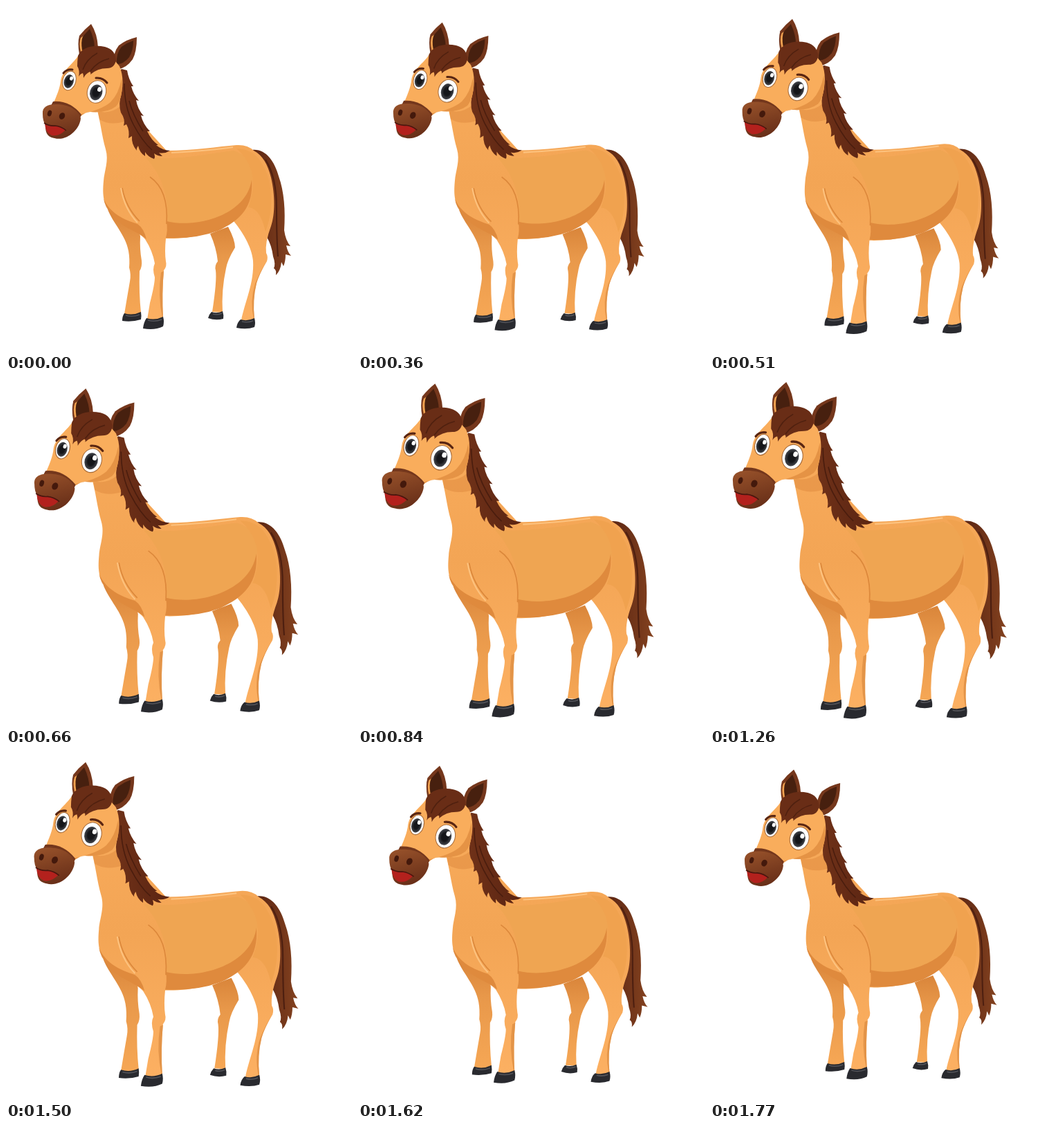
These frames come from a looping animation (500 px wide and 500 px high, 1800 ms). An HTML page:

```html
<!DOCTYPE html>
<html lang="en">
<head>
<meta charset="utf-8">
<title>Horse</title>
<style>
  html, body { margin: 0; width: 100%; height: 100%; overflow: hidden; background: #fff; }
  svg { display: block; width: 100vw; height: 100vh; }
</style>
</head>
<body>
<svg viewBox="0 0 500 500">
  <defs>
    <linearGradient id="coat" x1="0" y1="0" x2="0" y2="1">
      <stop offset="0" stop-color="#f8ab5b"/>
      <stop offset=".45" stop-color="#f3a555"/>
      <stop offset="1" stop-color="#fcb062"/>
    </linearGradient>
    <linearGradient id="far" x1="0" y1="0" x2="0" y2="1">
      <stop offset="0" stop-color="#d9853a"/>
      <stop offset=".35" stop-color="#e8984a"/>
      <stop offset="1" stop-color="#f6a755"/>
    </linearGradient>
    <linearGradient id="tail" x1="0" y1="0" x2="1" y2="0">
      <stop offset="0" stop-color="#5a2513"/>
      <stop offset="1" stop-color="#84421f"/>
    </linearGradient>
    <linearGradient id="mane" x1="0" y1="0" x2="1" y2="0">
      <stop offset="0" stop-color="#6f3118"/>
      <stop offset="1" stop-color="#5a2412"/>
    </linearGradient>
    <linearGradient id="nose" x1="0" y1="0" x2=".3" y2="1">
      <stop offset="0" stop-color="#99532b"/>
      <stop offset="1" stop-color="#6a3019"/>
    </linearGradient>
    <radialGradient id="iris">
      <stop offset=".5" stop-color="#15161a"/>
      <stop offset="1" stop-color="#45474d"/>
    </radialGradient>
  </defs>

  <g id="horse">
    <!-- tail -->
    <path fill="url(#tail)" d="M356 208C375 206 388 224 394 246C402 268 404 296 402 324Q404 339 411 347L405 346Q407 356 412 361L404 359Q404 369 401 376L398 370Q397 382 390 389Q391 381 387 379Q390 373 386 362Q384 346 377 334L384 290Z"/>
    <path fill="none" stroke="#4d1f10" stroke-width="2" d="M375 222Q391 247 391 292T393 362"/>

    <!-- far legs -->
    <path fill="url(#far)" d="M147 294C154 313 173 331 177 354Q179 365 178 378Q181 388 179 398Q175 421 171 445Q182 449 195 443Q192 415 193 383Q197 377 196 368Q193 351 194 333L190 310Z"/>
    <path fill="url(#far)" d="M295 329Q304 349 306 369Q301 375 303 382Q305 397 298 442L313 443Q311 411 318 379Q320 367 331 349Q331 338 321 319Z"/>

    <!-- body with near legs -->
    <path fill="url(#coat)" d="M130 144C137 168 138 186 144 207C149 224 142 238 141 253C139 275 141 286 152 299C165 315 191 325 201 337Q212 354 215 372Q211 380 215 392Q215 402 208 429L204 453Q215 458 227 451Q225 416 228 382Q233 376 231 369Q229 355 231 336C263 337 300 330 329 311C340 324 355 347 357 368C359 400 345 428 340 454Q349 459 359 453Q356 422 362 400Q368 383 377 369Q379 362 376 357Q374 342 383 318C389 301 389 273 383 248C378 228 371 216 358 209Q349 200 333 201C307 203 272 209 232 209L200 174L168 96Z"/>
    <!-- barrel -->
    <path fill="#efa552" d="M202 219C250 224 306 211 329 209C353 216 361 240 355 259C347 294 315 311 281 317Q252 321 233 316C235 279 229 249 202 219Z"/>
    <path fill="#f0a24f" d="M333 206Q359 206 371 230C386 254 387 298 375 326C371 308 364 292 350 291Q370 238 333 206Z"/>
    <!-- shadows -->
    <path fill="#df8a3d" d="M232 311C278 322 348 301 355 251C358 290 339 310 306 325Q274 337 231 335Q234 324 232 311Z"/>
    <path fill="#df8a3d" d="M141 278C150 300 171 309 190 315Q199 321 203 337C190 325 163 319 152 300Q143 291 141 278Z"/>
    <path fill="#e08d40" d="M133 152Q151 157 166 144L168 110Q166 143 174 166Q151 174 135 164Z" opacity=".55"/>
    <path fill="none" stroke="#dc883b" stroke-width="1.6" d="M208 247C227 260 234 285 232 315M168 263Q173 291 193 311"/>
    <path fill="none" stroke="#fdc27e" stroke-width="2" d="M166 263Q171 293 190 313M239 212Q294 209 328 204"/>
    <path fill="#e39448" d="M226 451Q219 418 224 385L228 383Q225 415 227 451ZM358 453Q352 426 360 401Q368 382 376 370Q365 389 362 401Q356 425 359 453Z"/>

    <!-- hooves -->
    <g fill="#292a2f">
      <path d="M171 444Q183 448 195 442Q196 448 195 453Q182 457 168 455Q168 448 171 444Z"/>
      <path d="M203 451Q215 455 227 449Q229 456 227 463Q215 469 198 466Q199 457 203 451Z"/>
      <path d="M297 442Q305 445 313 441Q315 447 314 452Q303 455 292 451Q293 446 297 442Z"/>
      <path d="M339 453Q349 456 359 451Q361 458 359 464Q348 468 333 465Q334 457 339 453Z"/>
    </g>
    <path fill="none" stroke="#53545a" stroke-width="1.5" d="M173 447Q183 450 193 446M205 454Q215 457 225 453M299 445Q306 447 312 444M341 456Q349 458 357 455"/>

    <!-- mane -->
    <path fill="url(#mane)" d="M167 91L175 93Q177 106 184 116L181 116Q184 128 192 137L188 136Q190 149 199 159L195 158Q198 171 208 181L204 181Q210 194 220 201L217 201Q225 208 237 209Q229 214 221 212L226 217Q219 217 214 213Q216 218 214 221Q205 218 201 211L201 217Q193 212 191 202Q188 206 189 209Q181 200 182 188L177 191Q179 180 174 171L170 173Q173 164 166 154Q162 142 167 124Q169 109 164 94Z"/>
    <path fill="none" stroke="#4a1d0e" stroke-width="1.5" d="M171 112Q171 146 184 171T211 208M178 137Q183 157 198 181"/>

    <!-- ears -->
    <g id="ears">
      <path fill="#75371c" d="M106 70Q103 54 106 43Q113 34 123 26Q132 40 133 60L122 66Z"/>
      <path fill="#f2a351" d="M108 66Q105 54 108 46L112 43Q112 56 116 63Z"/>
      <path fill="#47200f" d="M110 64Q108 51 111 44L121 33Q128 48 128 61Z"/>
      <path fill="#75371c" d="M155 87Q154 68 163 57Q175 48 189 45Q189 66 183 77Q174 90 160 92Z"/>
      <path fill="#47200f" d="M160 84Q159 68 167 59Q175 53 184 50Q184 64 178 74Q170 84 160 84Z"/>
    </g>

    <!-- head -->
    <path fill="#f9ad5c" d="M106 69C99 83 82 91 79 108C78 119 73 130 68 142L107 160Q112 154 122 153C143 155 159 149 164 138C170 118 170 101 164 87C148 66 122 55 106 69Z"/>
    <path fill="#e59345" d="M109 156Q138 150 151 139Q163 127 167 105Q170 132 159 145Q146 155 122 153Q113 154 107 160Z"/>

    <!-- muzzle -->
    <path fill="#74371c" d="M68 138Q92 136 109 157L106 164L65 144Z"/>
    <path fill="url(#nose)" d="M53 156C52 146 60 142 72 142C91 142 104 150 108 162C107 178 88 196 70 191C58 189 57 181 57 172Q53 166 53 156Z"/>
    <path fill="#b3211d" d="M56 170Q62 174 70 173Q79 174 86 179Q77 189 66 187Q57 183 56 170Z"/>
    <path fill="none" stroke="#4a160e" stroke-width="1.6" d="M55 169Q63 174 71 173Q80 174 87 180"/>
    <ellipse cx="63" cy="155" rx="3" ry="4.5" fill="#44190c" transform="rotate(18 63 155)"/>
    <ellipse cx="81" cy="159" rx="4" ry="5" fill="#44190c" transform="rotate(28 81 159)"/>

    <!-- eyes -->
    <g transform="translate(91.5 108) rotate(16)">
      <ellipse rx="9.5" ry="14" fill="#fff" stroke="#a66a38"/>
      <ellipse cx="-.5" cy="1" rx="7" ry="10" fill="url(#iris)"/>
      <ellipse cx="2" cy="-4" rx="2.4" ry="3" fill="#fff"/>
    </g>
    <g transform="translate(131 124) rotate(16)">
      <ellipse rx="13.5" ry="16.5" fill="#fff" stroke="#a66a38"/>
      <ellipse cx="-.5" cy="1" rx="9" ry="11.5" fill="url(#iris)"/>
      <ellipse cx="3" cy="-4.5" rx="3" ry="3.5" fill="#fff"/>
    </g>
    <path fill="none" stroke="#5a2612" stroke-width="3" stroke-linecap="round" d="M83 97Q88 91 96 92M130 104Q140 103 146 111"/>

    <!-- forelock -->
    <path fill="#692d16" d="M104 72C109 60 126 55 143 59Q158 63 159 78Q157 90 146 90Q132 90 122 99Q123 96 121 95Q115 98 112 104Q112 99 111 97Q107 98 105 102Q107 93 103 87Q103 80 104 72Z"/>
    <path fill="none" stroke="#4f200f" stroke-width="1.5" d="M111 92Q116 77 132 68M122 94Q132 80 149 76"/>
  </g>
</svg>
<script>
  const LOOP = 1800, STEP = 30, HOLD = 240, PEAK = 1085, SWELL = 0.0565;
  const CX = 247, CY = 249;
  const horse = document.getElementById("horse");

  function scaleAt(ms) {
    const t = Math.floor((ms % LOOP) / STEP) * STEP;
    if (t < HOLD) return 1;
    return 1 + SWELL * (1 + Math.cos((t - PEAK) / LOOP * 2 * Math.PI));
  }

  const start = performance.now();
  function draw() {
    const s = scaleAt(performance.now() - start);
    horse.setAttribute("transform", `translate(${CX} ${CY}) scale(${s}) translate(${-CX} ${-CY})`);
    requestAnimationFrame(draw);
  }
  draw();
</script>
</body>
</html>
```
